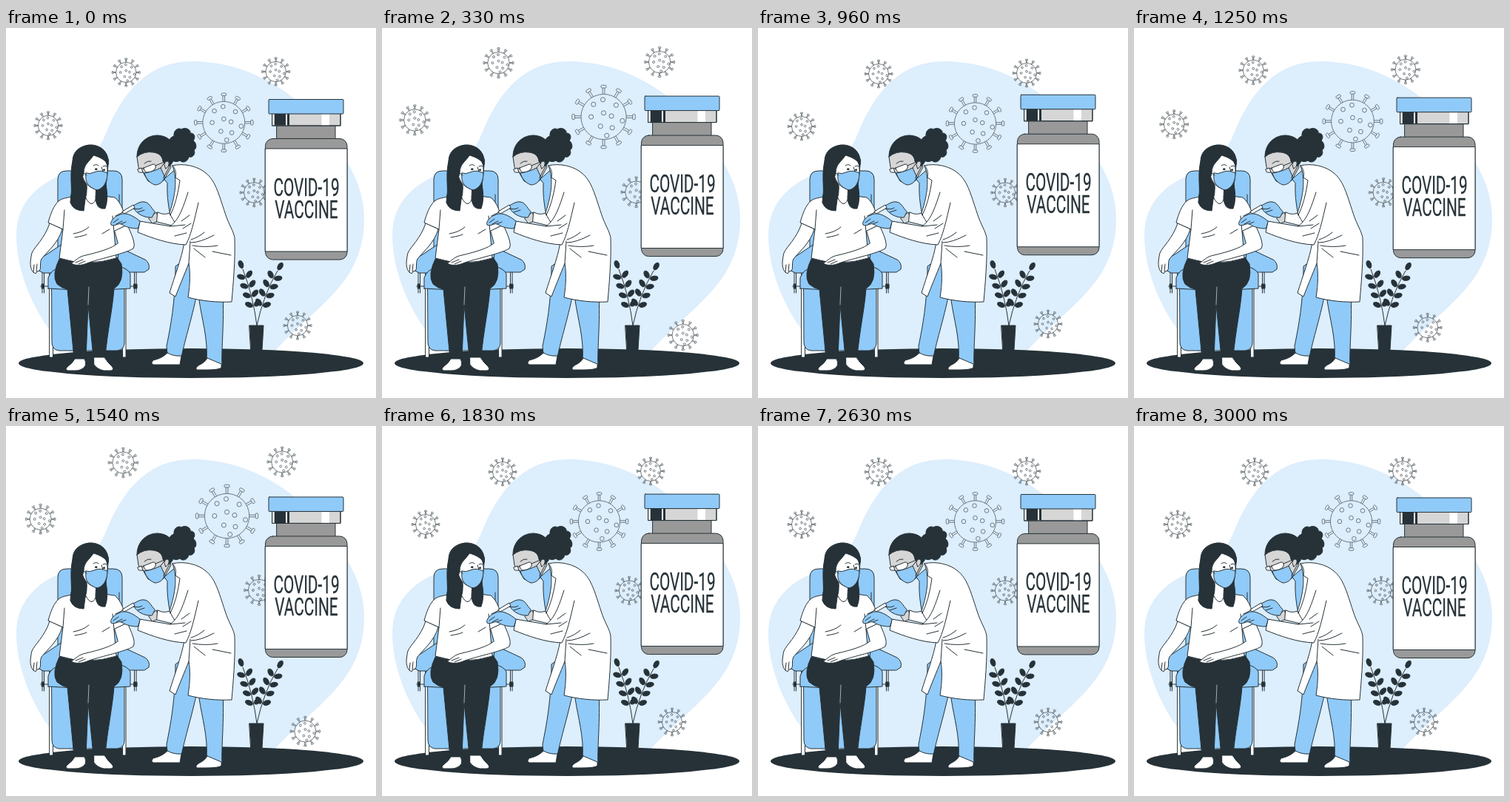
An HTML page that plays this animation: 500x500 px, repeating every 3040 ms.

```html
<!DOCTYPE html>
<html lang="en">
<head>
<meta charset="utf-8">
<title>Vaccination</title>
<style>
html, body { margin: 0; width: 100%; height: 100%; overflow: hidden; background: #fff; }
svg { display: block; width: 100vw; height: 100vh; }
.art { stroke: #263238; stroke-width: 1; stroke-linejoin: round; stroke-linecap: round; fill: none; }
.b { fill: #90caf9; }
.w { fill: #fff; }
.g { fill: #999; }
.l { fill: #d6d6d6; }
.k { fill: #263238; }
#viruses { stroke: #525c61; stroke-width: .8; fill: none; }
#viruses * { vector-effect: non-scaling-stroke; }
.label { font: 32.5px Roboto, sans-serif; fill: #263238; stroke: #263238; stroke-width: .3; text-anchor: middle; }
</style>
</head>
<body>
<svg viewBox="0 0 500 500">
  <path fill="#ddeefd" d="M14 280C14 235 45 208 85 195C112 185 122 168 132 150C150 105 180 45 252 45C310 45 360 70 395 100C438 145 484 195 484 258C484 320 450 352 425 377C400 400 380 418 360 440H90C50 410 14 340 14 280Z"/>
  <ellipse class="k" cx="250" cy="453" rx="233" ry="20"/>
  <g id="viruses"></g>

  <g class="art">
    <g id="plant"></g>
    <path class="k" d="M329 402H348L346 435H331Z"/>

    <!-- chair -->
    <path class="b" d="M70 345V205Q70 193 82 193H145Q157 193 157 205V345Z"/>
    <path d="M153 225V300"/>
    <path class="w" d="M59 330H63.500V445H59ZM158 330H162V445H158Z"/>
    <path d="M49 328V358M51.500 328V358M173.500 328V358M176 328V358M47 349H59M162 349H177"/>
    <path class="k" d="M48.500 346h3v6h-3zM173 346h4v6h-4z"/>
    <path class="b" d="M153 300L158 299L188 313Q195 318 193 326L187 330H165L150 324Z"/>
    <path class="b" d="M76 292L46 312Q38 320 43 327L50 331H66L78 320Z"/>
    <path class="b" d="M62 350H160V425Q160 435 150 436H72Q62 435 62 425Z"/>
    <path class="b" d="M57 352V338Q62 318 110 318Q162 318 168 332V352Q110 356 57 352Z"/>

    <!-- patient -->
    <path class="k" d="M73 310Q61 334 69 346Q76 352 83 353L92 447H108L111 374L118 445H134C137 410 144 380 146 352Q160 344 156 319L150 310Q110 325 73 310Z"/>
    <path d="M111 374L112 350" stroke="#fff" stroke-width=".6"/>
    <path class="w" d="M93 447H106Q109 452 107 457Q102 463 94 463H83Q79 461 84 457Q90 453 93 447ZM119 445H133Q138 453 143 457Q147 462 142 463H132Q123 461 119 455Z"/>
    <path class="k" d="M90 180C85 202 91 220 87 236Q92 247 105 247L112 222H122C125 238 129 244 136 243C139 230 133 220 136 205L138 185C140 166 126 157 112 158C98 160 90 168 90 180Z"/>
    <path class="w" d="M59 264C52 285 39 295 35 304C32 317 32 326 38 331Q41 333 42 329L45 328C48 325 45 318 48 312C56 302 71 290 76 272Z"/>
    <path d="M38 320L37 330M42 319L41 329"/>
    <path class="w" d="M107 226C95 228 80 228 72 233C64 240 60 252 57 263L77 272L72 311Q110 323 149 311L146 275L164 266C160 250 156 236 147 229L124 226Z"/>
    <path d="M77 272L79 246M146 275L144 254M91 278Q104 276 112 269M93 283Q105 281 109 279M140 272L130 278"/>
    <path class="w" d="M108 208L107 228Q117 248 123 226L122 215Z"/>
    <path class="k" d="M88 225Q91 213 90 190L106 195Q112 216 107 232L105 247Q91 247 87 236ZM122 217L135 212Q139 230 134 244Q122 246 121 230Z"/>
    <path class="w" d="M147 274L164 266C169 278 176 291 172 298C160 305 130 311 112 317C101 322 93 321 88 318C94 315 97 309 108 307C125 303 143 298 151 291Z"/>
    <path d="M94 317L104 313M98 319L107 315"/>
    <path class="w" d="M104 182L118 169C130 172 138 180 137 192C137 210 128 219 121 218C108 214 104 205 102 195Z"/>
    <path class="k" d="M90 186C91 158 122 149 136 172Q140 179 138 185C134 178 126 174 118 172C114 180 105 183 105 196L100 215Z"/>
    <path class="b" d="M108 196Q113 198 119 195Q127 191 137 196C137 208 132 217 123 219C116 217 109 212 108 205Z"/>
    <path d="M102 194L109 199M118 186Q122 183 125 186M131 187Q134 185 136 187M129 188L131 194"/>
    <path class="k" d="M121 190h2v1.500h-2zM132 191h1.500v1.500h-1.500z"/>

    <!-- doctor -->
    <path class="b" d="M249 308L229 322C229 370 222 405 217 430L218 442L237 445C242 420 252 390 260 350Z"/>
    <path class="b" d="M248 358H293C295 400 291 430 292 456L271 449C273 420 265 395 261 368Z"/>
    <path class="w" d="M218 439Q227 444 237 443L235 455H199Q195 453 199 449Q212 446 218 439ZM272 446L291 454V459Q288 462 270 462H258Q255 460 260 456Q269 452 272 446Z"/>
    <path class="l" d="M193 257L203 249L208 260L198 264Z"/>
    <path class="w" d="M205 249Q216 255 226 247L229 268L204 262Z"/>
    <path class="b" d="M214 204L230 190L233 240L222 253Q217 230 218 210Z"/>
    <path class="w" d="M225 186C240 182 260 187 270 196C283 206 288 226 296 250C301 266 308 275 309 284C310 315 307 345 305 370C285 371 265 369 246 364C249 345 249 330 247 318C241 333 234 350 229 363L221 358C228 335 237 312 241 290C237 275 226 261 221 250C229 225 232 205 225 186Z"/>
    <path d="M225 186Q231 192 229 202L235 206Q231 235 222 253M247 318L249 288M250 290Q262 290 281 280M252 294Q270 297 286 294M250 286Q260 283 268 276M254 298L269 310M279 302L304 307"/>
    <path class="w" d="M246 222C240 240 235 258 222 268L181 261L178 276C198 284 220 292 243 293C250 280 254 262 260 236"/>
    <path d="M222 268L242 266M237 261L248 253M239 271L250 264M228 281L244 277"/>
    <path class="b" d="M201 248C195 242 194 236 187 235C180 234 176 239 169 241Q167 244 173 244C176 250 186 257 197 256Z"/>
    <path class="w" d="M157 248L172 239L174 243L160 251Z"/>
    <path d="M148 254L158 249M173 244Q180 246 184 243M178 249L187 246"/>
    <path class="b" d="M181 261C170 252 160 248 152 253C146 255 140 262 142 266C146 269 152 263 156 265C163 270 172 271 178 271Z"/>
    <path d="M145 263L152 258M149 265L157 261M155 265L162 262"/>

    <path class="l" d="M183 165L177 174L179 188Q180 192 184 193L192 207Q205 213 213 206L223 188L215 165Z"/>
    <path class="b" d="M187 196Q200 194 209 189L214 200C214 208 207 212 201 212C194 209 189 204 187 196Z"/>
    <path d="M209 189L215 181M213 202L221 187"/>
    <path class="k" d="M177 174C177 156 190 145 205 145C219 146 225 153 226 162C230 175 225 184 220 187C217 181 213 184 212 180C211 172 206 169 199 168Q187 166 177 174Z"/>
    <path class="l" d="M214 184Q216 178 220 181Q221 187 216 190Z"/>
    <path class="w" d="M186 189L199 184Q203 184 202 189Q200 194 191 195Q187 195 186 189ZM178 191L183 189L185 195L180 195Z"/>
    <path d="M202 186L214 181M183 190L186 190M187 183Q191 179 196 180"/>
    <path class="k" d="M227 146C226 138 233 134 237 137C243 133 250 138 249 142C256 142 256 149 253 152C258 156 258 163 254 165C257 171 251 176 247 174C246 181 238 183 235 179C229 183 222 179 224 174C219 171 219 164 223 162C218 156 220 148 227 146Z"/>
  </g>

  <g id="vial">
    <g class="art">
      <path class="g" d="M366 132H445V152H366Z"/>
      <rect class="l" x="360" y="116" width="92" height="16.500"/>
      <path class="k" stroke="none" d="M362.500 116H378V132H362.500ZM380 116H383V132H380Z"/>
      <path class="w" stroke="none" d="M426.500 116.500H437V132H426.500ZM360.500 116.500H362.500V132H360.500ZM378 116.500H380V132H378Z"/>
      <rect x="360" y="116" width="92" height="16.500"/>
      <rect class="b" x="355" y="97" width="101" height="19.500" rx="1"/>
      <rect class="g" x="350.500" y="150" width="110.500" height="163.500" rx="10"/>
      <path class="w" d="M350.500 163.500H461V302.500H350.500Z"/>
    </g>
    <g class="label" transform="translate(406 0) scale(.64 1)">
      <text y="227">COVID-19</text>
      <text y="257">VACCINE</text>
    </g>
  </g>
</svg>
<script>
const $ = id => document.getElementById(id);

// virus: ring, twelve knobbed spikes, scattered spots
const spike = a => `<g transform="rotate(${a})"><path d="M-1.300 -29V-37M1.300 -29V-37"/><rect x="-3.500" y="-40.500" width="7" height="3.500" rx="1.700"/></g>`;
const spots = [[-13, -16], [-1, -22], [16, -15], [0, -5], [10, -1], [-16, 0], [24, 5], [-4, 12], [11, 14], [4, 24]];
const virus = Array.from({ length: 12 }, (_, i) => spike(i * 30)).join('') + '<circle r="29"/>' +
  spots.map(([x, y]) => `<circle cx="${x}" cy="${y}" r="2.900"/>`).join('');
const places = [[59, 133, .465], [163, 62, .465], [363, 61, .465], [293.5, 129, .97], [334, 222.5, .47], [392, 400, .465]];
$('viruses').innerHTML = places.map(([x, y, s]) =>
  `<g transform="translate(${x} ${y}) scale(${s})">${virus}</g>`).join('');

// branch: quadratic stem with paired leaves and one at the tip
function branch(cx, cy, x, y) {
  const leaf = (px, py, a) => `<ellipse class="k" cx="7" rx="5.200" ry="3.100" transform="translate(${px} ${py}) rotate(${a})"/>`;
  let out = `<path d="M339 402Q${cx} ${cy} ${x} ${y}"/>`;
  for (let u = .32; u < 1.01; u += .17) {
    const v = 1 - u;
    const px = v * v * 339 + 2 * u * v * cx + u * u * x;
    const py = v * v * 402 + 2 * u * v * cy + u * u * y;
    const a = Math.atan2(v * (cy - 402) + u * (y - cy), v * (cx - 339) + u * (x - cx)) * 180 / Math.PI;
    out += u > .95 ? leaf(px, py, a) : leaf(px, py, a - 55) + leaf(px, py, a + 55);
  }
  return out;
}
$('plant').innerHTML = branch(334, 362, 320, 326) + branch(348, 360, 367, 328);

// double heartbeat, piecewise linear: [time, growth]
const beat = [[0, 0], [300, .1], [900, 0], [1200, 0], [1500, .1], [1800, 0], [3001, 0]];
function growth(t) {
  const i = beat.findIndex(([end]) => end > t);
  const [t0, a] = beat[i - 1], [t1, b] = beat[i];
  return a + (b - a) * (t - t0) / (t1 - t0);
}

const LOOP = 3040, FPS = 24, LEAD = 36;
const start = performance.now();
function draw() {
  const now = (performance.now() - start) % LOOP;
  const t = Math.min(Math.floor((now + 5) * FPS / 1000) * 1000 / FPS + LEAD, 3000);
  const lift = 10 * (1 - Math.abs(t % 1500 / 750 - 1));
  $('vial').setAttribute('transform', `translate(0 ${-lift})`);
  $('viruses').setAttribute('transform', `translate(225.5 230) scale(${1 + growth(t)}) translate(-225.5 -230)`);
  requestAnimationFrame(draw);
}
draw();
</script>
</body>
</html>
```
